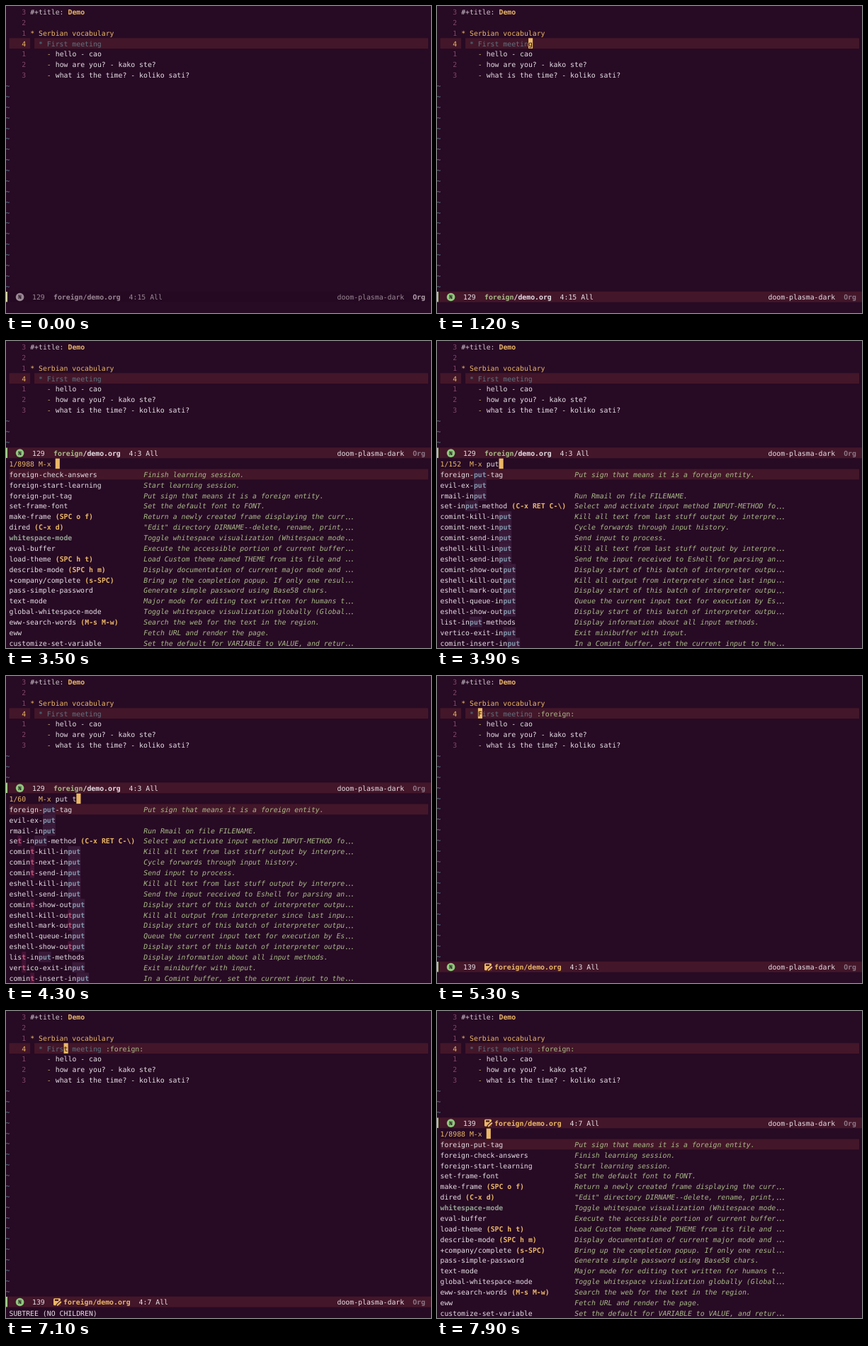
An HTML page with a canvas for the animation above (8 s loop, 600 by 433 pixels).

```html
<!DOCTYPE html>
<html lang="en">
<head>
<meta charset="utf-8">
<title>Editor demo</title>
<style>
html, body { margin: 0; width: 100%; height: 100%; overflow: hidden; background: #270a24; }
canvas { display: block; }
</style>
</head>
<body>
<canvas id="stage" width="600" height="433"></canvas>
<script>
const ctx = document.getElementById("stage").getContext("2d");
const LOOP = 8000, CELL = 5.93, LINE = 14.87, LEFT = 4.5;
const FAMILY = '"DejaVu Sans Mono", "Noto Sans Mono", monospace';
const C = {
  bg: "#270a24", line: "#431629", text: "#e6dfe6", yellow: "#ebb866", number: "#80466a",
  teal: "#5e7482", star: "#4a7c88", green: "#a9bb88", lime: "#8fc87c", dim: "#8c7788",
  tilde: "#5f8a94", bullet: "#c9b96a", dark: "#1d0a1b", idle: "#9a8794"
};

ctx.textRendering = "geometricPrecision";
ctx.font = `100px ${FAMILY}`;
const SIZE = 100 * CELL / ctx.measureText("M").width;

const HISTORY = [
  ["foreign-check-answers", "", "Finish learning session."],
  ["foreign-start-learning", "", "Start learning session."],
  ["foreign-put-tag", "", "Put sign that means it is a foreign entity."],
  ["set-frame-font", "", "Set the default font to FONT."],
  ["make-frame", "SPC o f", "Return a newly created frame displaying the curr…"],
  ["dired", "C-x d", '"Edit" directory DIRNAME--delete, rename, print,…'],
  ["whitespace-mode", "", "Toggle whitespace visualization (Whitespace mode…"],
  ["eval-buffer", "", "Execute the accessible portion of current buffer…"],
  ["load-theme", "SPC h t", "Load Custom theme named THEME from its file and …"],
  ["describe-mode", "SPC h m", "Display documentation of current major mode and …"],
  ["+company/complete", "s-SPC", "Bring up the completion popup. If only one resul…"],
  ["pass-simple-password", "", "Generate simple password using Base58 chars."],
  ["text-mode", "", "Major mode for editing text written for humans t…"],
  ["global-whitespace-mode", "", "Toggle whitespace visualization globally (Global…"],
  ["eww-search-words", "M-s M-w", "Search the web for the text in the region."],
  ["eww", "", "Fetch URL and render the page."],
  ["customize-set-variable", "", "Set the default for VARIABLE to VALUE, and retur…"]
];
const OTHERS = [
  ["evil-ex-put", "", ""],
  ["rmail-input", "", "Run Rmail on file FILENAME."],
  ["set-input-method", "C-x RET C-\\", "Select and activate input method INPUT-METHOD fo…"],
  ["comint-kill-input", "", "Kill all text from last stuff output by interpre…"],
  ["comint-next-input", "", "Cycle forwards through input history."],
  ["comint-send-input", "", "Send input to process."],
  ["eshell-kill-input", "", "Kill all text from last stuff output by interpre…"],
  ["eshell-send-input", "", "Send the input received to Eshell for parsing an…"],
  ["comint-show-output", "", "Display start of this batch of interpreter outpu…"],
  ["eshell-kill-output", "", "Kill all output from interpreter since last inpu…"],
  ["eshell-mark-output", "", "Display start of this batch of interpreter outpu…"],
  ["eshell-queue-input", "", "Queue the current input text for execution by Es…"],
  ["eshell-show-output", "", "Display start of this batch of interpreter outpu…"],
  ["list-input-methods", "", "Display information about all input methods."],
  ["vertico-exit-input", "", "Exit minibuffer with input."],
  ["comint-insert-input", "", "In a Comint buffer, set the current input to the…"]
];
const RECENT = [HISTORY[2], ...HISTORY.filter((_, i) => i !== 2)];
const COUNTS = { "": 8988, "p": 4312, "pu": 391, "put": 152, "put ": 152, "put t": 60 };
const MATCH = [["#8296aa", "#391a39"], ["#c25a7c", "#451336"]];

// Each entry changes part of the state at its time in ms.
const EVENTS = [
  [0, { active: false, col: 15, query: null, tag: false, folded: false, echo: "", list: HISTORY }],
  [400, { active: true }],
  [1900, { col: 9 }],
  [2100, { col: 3 }],
  [2600, { echo: "path" }],
  [3100, { query: "", echo: "" }],
  [3700, { query: "p" }],
  [3800, { query: "pu" }],
  [3900, { query: "put" }],
  [4100, { query: "put " }],
  [4300, { query: "put t" }],
  [4700, { query: null, tag: true, list: RECENT }],
  [6300, { col: 7 }],
  [6600, { folded: true, echo: "FOLDED" }],
  [6900, { folded: false, echo: "SUBTREE (NO CHILDREN)" }],
  [7500, { query: "", echo: "" }]
];
const stateAt = t => Object.assign({}, ...EVENTS.filter(e => e[0] <= t).map(e => e[1]));

const colX = c => LEFT + c * CELL;
const rowY = r => 8 + r * LINE;
const promptY = r => 173 + r * 14.87;

function rect(x, y, w, h, color) {
  ctx.fillStyle = color;
  ctx.fillRect(x, y, w, h);
}

function text(str, x, y, color, style = "") {
  const cut = str.endsWith("…");
  const body = cut ? str.slice(0, -1) : str;
  ctx.font = `${style} ${SIZE}px ${FAMILY}`;
  ctx.fillStyle = color;
  ctx.fillText(body, x, y + 4);
  if (cut) {
    const end = x + body.length * CELL;
    for (let i = 0; i < 3; i++) ctx.fillRect(end + 1.2 + i * 4, y + 2.7, 1.4, 1.4);
  }
}

function cursor(x, y, char = "") {
  rect(x, y - 7.3, CELL + 0.2, 14.6, C.yellow);
  text(char, x, y, C.dark);
}

function arrow(x, y) {
  ctx.strokeStyle = C.text;
  ctx.lineWidth = 1;
  ctx.beginPath();
  ctx.moveTo(x + 0.5, y + 0.5);
  ctx.lineTo(x + 11, y + 0.5);
  ctx.moveTo(x + 8, y - 2.5);
  ctx.lineTo(x + 11, y + 0.5);
  ctx.lineTo(x + 8, y + 3.5);
  ctx.stroke();
}

function drawBuffer(s) {
  const open = s.query !== null;
  const y = rowY(3), heading = "First meeting";
  ["3", "2", "1"].forEach((n, r) => text(n, colX(3), rowY(r), C.number));
  text("#+title:", colX(5), rowY(0), "#cfc4cd");
  text("Demo", colX(14), rowY(0), C.yellow, "bold");
  text("* Serbian vocabulary", colX(5), rowY(2), C.yellow);

  rect(LEFT, y - 7.3, 5 * CELL, 14.8, C.line);
  rect(colX(6), y - 7.3, 596 - colX(6), 14.8, C.line);
  text("4", colX(3), y, C.yellow);
  text("*", colX(7), y, C.star);
  text(heading, colX(9), y, C.teal);
  if (s.tag) text(":foreign:", colX(23), y, C.green);
  if (s.folded) text("[...]", colX(33), y, C.teal);
  if (s.active && !open) cursor(colX(6 + s.col), y, heading[s.col - 3]);

  const items = s.folded ? [] :
    ["hello - cao", "how are you? - kako ste?", "what is the time? - koliko sati?"];
  items.forEach((item, i) => {
    text(String(i + 1), colX(3), rowY(4 + i), C.number);
    text("-", colX(9), rowY(4 + i), C.bullet);
    text(item, colX(11), rowY(4 + i), C.text);
  });
  for (let r = 4 + items.length; r < (open ? 10 : 27); r++) text("~", -0.5, rowY(r), C.tilde);
}

function saveIcon(x, y) {
  ctx.fillStyle = C.yellow;
  ctx.beginPath();
  ctx.roundRect(x, y - 5, 10, 10, 1.5);
  ctx.fill();
  rect(x + 2, y - 3.5, 5, 2.2, C.line);
  ctx.lineCap = "round";
  for (const [color, width] of [[C.line, 4.5], [C.yellow, 2.2]]) {
    ctx.strokeStyle = color;
    ctx.lineWidth = width;
    ctx.beginPath();
    ctx.moveTo(x + 5.8, y + 4.6);
    ctx.lineTo(x + 10.2, y + 0.4);
    ctx.stroke();
  }
  ctx.lineCap = "butt";
}

function drawModeLine(s) {
  const y = s.query === null ? 410.2 : 157.8;
  const tone = color => s.active ? color : C.idle;
  rect(0, y - 7.5, 600, 15, s.active ? C.line : "#250922");
  rect(0, y - 7.2, 2, 14.4, s.active ? "#a3cf8c" : "#d8d6a4");
  ctx.fillStyle = tone(C.lime);
  ctx.beginPath();
  ctx.arc(19.6, y + 0.3, 5.8, 0, 2 * Math.PI);
  ctx.fill();
  ctx.font = `bold 7.5px ${FAMILY}`;
  ctx.fillStyle = C.dark;
  ctx.fillText("N", 17.3, y + 3.1);

  text(s.tag ? "139" : "129", 37, y, tone(C.text));
  const fileX = s.tag ? 81 : 67;
  if (s.tag) {
    saveIcon(67, y);
    text("foreign/demo.org", fileX, y, C.yellow, "bold");
  } else {
    text("foreign", fileX, y, tone(C.green), "bold");
    text("/demo.org", fileX + 7 * CELL, y, tone(C.text), "bold");
  }
  text(`4:${s.col} All`, fileX + 106.6, y, tone(C.text));
  text("doom-plasma-dark", 467.5, y, tone(C.text));
  text("Org", 574.2, y, s.active ? C.dim : "#b3a0ac", "bold");
}

function drawEcho(s) {
  const y = 425.5;
  if (s.echo === "path") {
    arrow(colX(0), y);
    text("Serbian vocabulary", colX(3), y, C.yellow, "bold");
    arrow(colX(22), y);
    text("First meeting", colX(25), y, C.teal, "bold");
  } else {
    text(s.echo, colX(0), y, C.text);
  }
}

function drawCandidate([name, key, about], row, words) {
  const y = promptY(row + 1);
  if (row === 0) rect(LEFT, y - 7.3, 596 - LEFT, 14.8, C.line);
  const enabled = name === "whitespace-mode";
  text(name, colX(0), y, enabled ? "#93a594" : C.text, enabled ? "bold" : "");
  for (let i = words.length - 1; i >= 0; i--) {
    const at = name.indexOf(words[i]), [color, back] = MATCH[i];
    rect(colX(at), y - 7.3, words[i].length * CELL, 14.8, back);
    text(words[i], colX(at), y, color, "bold");
  }
  if (key) text(`(${key})`, colX(name.length + 1), y, C.yellow, "bold");
  text(about, colX(32), y, C.green, "italic");
}

function drawMinibuffer(s) {
  const words = s.query.split(" ").filter(Boolean);
  const y = promptY(0);
  text(`1/${COUNTS[s.query]}`.padEnd(7) + "M-x", colX(0), y, C.yellow);
  text(s.query, colX(11), y, C.text);
  cursor(colX(11 + s.query.length), y);
  [...s.list, ...OTHERS]
    .filter(([name]) => words.every(w => name.includes(w)))
    .slice(0, 17)
    .forEach((entry, row) => drawCandidate(entry, row, words));
}

function draw(t) {
  const s = stateAt(t);
  rect(0, 0, 600, 433, C.bg);
  drawBuffer(s);
  drawModeLine(s);
  if (s.query === null) drawEcho(s);
  else drawMinibuffer(s);
}

const start = performance.now();
function tick() {
  draw((performance.now() - start) % LOOP);
  requestAnimationFrame(tick);
}
tick();
</script>
</body>
</html>
```
